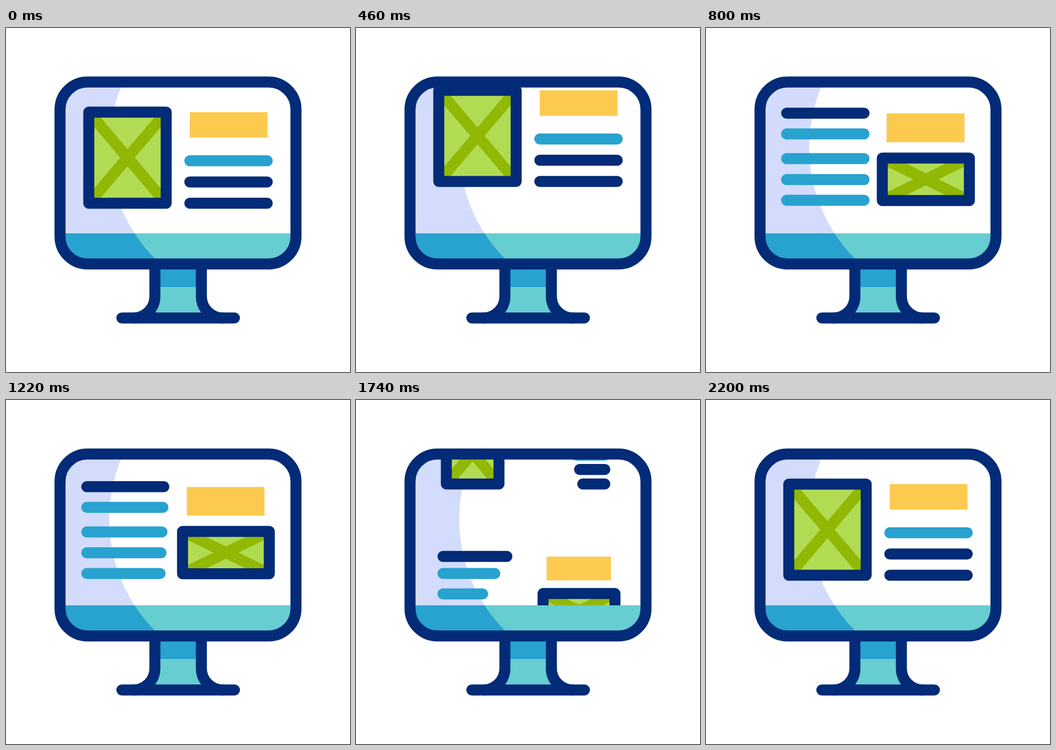
Recreate the animation shown at these times as an HTML page with a canvas. Size 640x640 px, loop 2400 ms.

```html
<!DOCTYPE html>
<html lang="en">
<head>
<meta charset="utf-8">
<title>Scrolling monitor</title>
<style>
  html, body { margin: 0; width: 100%; height: 100%; overflow: hidden; background: #fff; }
  canvas { display: block; width: 100vw; height: 100vh; object-fit: contain; }
</style>
</head>
<body>
<canvas id="stage" width="640" height="640"></canvas>
<script>
const ctx = document.getElementById('stage').getContext('2d');
const LOOP = 2400;
const STROKE = 20.5;
const NAVY = '#032b77', BLUE = '#28a2cf', TEAL = '#66cdd1', LAVENDER = '#d3dcfd',
      YELLOW = '#fdca50', LIME = '#b2db54', GREEN = '#91b805', WHITE = '#fff';

const clamp = x => Math.min(1, Math.max(0, x));
const ease = x => x * x * (3 - 2 * x);
const span = (t, a, b) => clamp((t - a) / (b - a));

function fillRect(x0, y0, x1, y1, color) {
  ctx.fillStyle = color;
  ctx.fillRect(x0, y0, x1 - x0, y1 - y0);
}

function line(x0, y0, x1, y1, color, cap = 'round') {
  ctx.strokeStyle = color;
  ctx.lineCap = cap;
  ctx.beginPath();
  ctx.moveTo(x0, y0);
  ctx.lineTo(x1, y1);
  ctx.stroke();
}

function imageBox(x0, y0, x1, y1) {
  fillRect(x0, y0, x1, y1, LIME);
  line(x0, y0, x1, y1, GREEN, 'butt');
  line(x0, y1, x1, y0, GREEN, 'butt');
  ctx.strokeStyle = NAVY;
  ctx.strokeRect(x0, y0, x1 - x0, y1 - y0);
}

// Scales coordinates about column centre cx, so strokes keep their weight.
const column = (cx, s, dy) => [x => cx + (x - cx) * s, y => y * s + dy];

function firstPage({ s, dy, shrink }) {
  const [lx, ly] = column(198, s, dy);
  const [rx, ry] = column(414, s, dy);
  imageBox(lx(154), ly(156.5), lx(298), ly(326));
  fillRect(rx(342), ry(156.5), rx(486.5), ry(204), YELLOW);
  [247, 286.5, 326].forEach((y, i) => {
    const k = clamp(1 - shrink * (0.46 + 0.06 * i));
    line(rx(486 - 144 * k), ry(y), rx(486), ry(y), i ? NAVY : BLUE);
  });
}

function secondPage({ s, dy, shrink }) {
  const [lx, ly] = column(218, s, dy);
  const [rx, ry] = column(443, s, dy);
  [158.5, 197, 243, 282, 320.5].forEach((y, i) => {
    const k = clamp(1 - shrink * i);
    line(lx(150), ly(y), lx(150 + 144 * k), ly(y), i ? BLUE : NAVY);
  });
  fillRect(rx(336), ry(159), rx(481), ry(212.5), YELLOW);
  imageBox(rx(328), ry(242), rx(490), ry(321));
}

function pages(t) {
  if (t < 800) {
    const p = ease(span(t, 340, 800)), r = 1 - p;
    firstPage({ s: 1, dy: -240.5 * p, shrink: 0 });
    if (p > 0) secondPage({ s: 1 - 0.478 * r, dy: 415 * r, shrink: 0.176 * r });
  } else if (t < 2200) {
    const out = Math.max(0, t - 1200) / 540;
    const q = out ** 1.17;
    secondPage({ s: 1 - 0.174 * q, dy: 160 * q, shrink: 0.19 * out ** 0.83 });
    if (out > 0) {
      const r = ((2200 - t) / 460) ** 1.17;
      firstPage({ s: 1 - 0.32 * r, dy: -65.5 * r, shrink: r });
    }
  } else {
    firstPage({ s: 1, dy: 0, shrink: 0 });
  }
}

function lightDisc(color) {
  ctx.fillStyle = color;
  ctx.beginPath();
  ctx.arc(487, 222, 295, 0, Math.PI * 2);
  ctx.fill();
}

function frame() {
  ctx.beginPath();
  ctx.roundRect(100.5, 100.5, 439, 338.5, 51);
}

function screen(t) {
  ctx.save();
  frame();
  ctx.clip();
  fillRect(100, 100, 540, 440, LAVENDER);
  lightDisc(WHITE);
  pages(t);
  ctx.beginPath();
  ctx.rect(100, 382, 440, 60);
  ctx.clip();
  fillRect(100, 382, 540, 442, BLUE);
  lightDisc(TEAL);
  ctx.restore();
  ctx.strokeStyle = NAVY;
  frame();
  ctx.stroke();
}

function leg(x, foot) {
  const bend = x + (foot - x) * 0.45;
  ctx.moveTo(x, 439);
  ctx.lineTo(x, 499.5);
  ctx.bezierCurveTo(x, 521.5, bend, 539.5, foot, 539.5);
}

function stand() {
  ctx.save();
  ctx.beginPath();
  leg(277, 237);
  ctx.lineTo(403.5, 539.5);
  ctx.bezierCurveTo(381.5, 539.5, 363.5, 521.5, 363.5, 499.5);
  ctx.lineTo(363.5, 439);
  ctx.clip();
  fillRect(230, 439, 410, 482.5, BLUE);
  fillRect(230, 482.5, 410, 540, TEAL);
  ctx.restore();
  ctx.strokeStyle = NAVY;
  ctx.lineCap = 'round';
  ctx.beginPath();
  leg(277, 237);
  leg(363.5, 403.5);
  ctx.stroke();
  line(215.5, 539.5, 425, 539.5, NAVY);
}

function draw(now) {
  const t = now % LOOP;
  const hop = ease(span(t, 60, 200)) - ease(span(t, 200, 340));
  fillRect(0, 0, 640, 640, WHITE);
  ctx.lineWidth = STROKE;
  ctx.lineJoin = 'round';
  ctx.save();
  ctx.translate(0, -25.5 * hop);
  stand();
  screen(t);
  ctx.restore();
}

let start;
function tick(now) {
  start ??= now;
  draw(now - start);
  requestAnimationFrame(tick);
}
draw(0);
requestAnimationFrame(tick);
</script>
</body>
</html>
```
